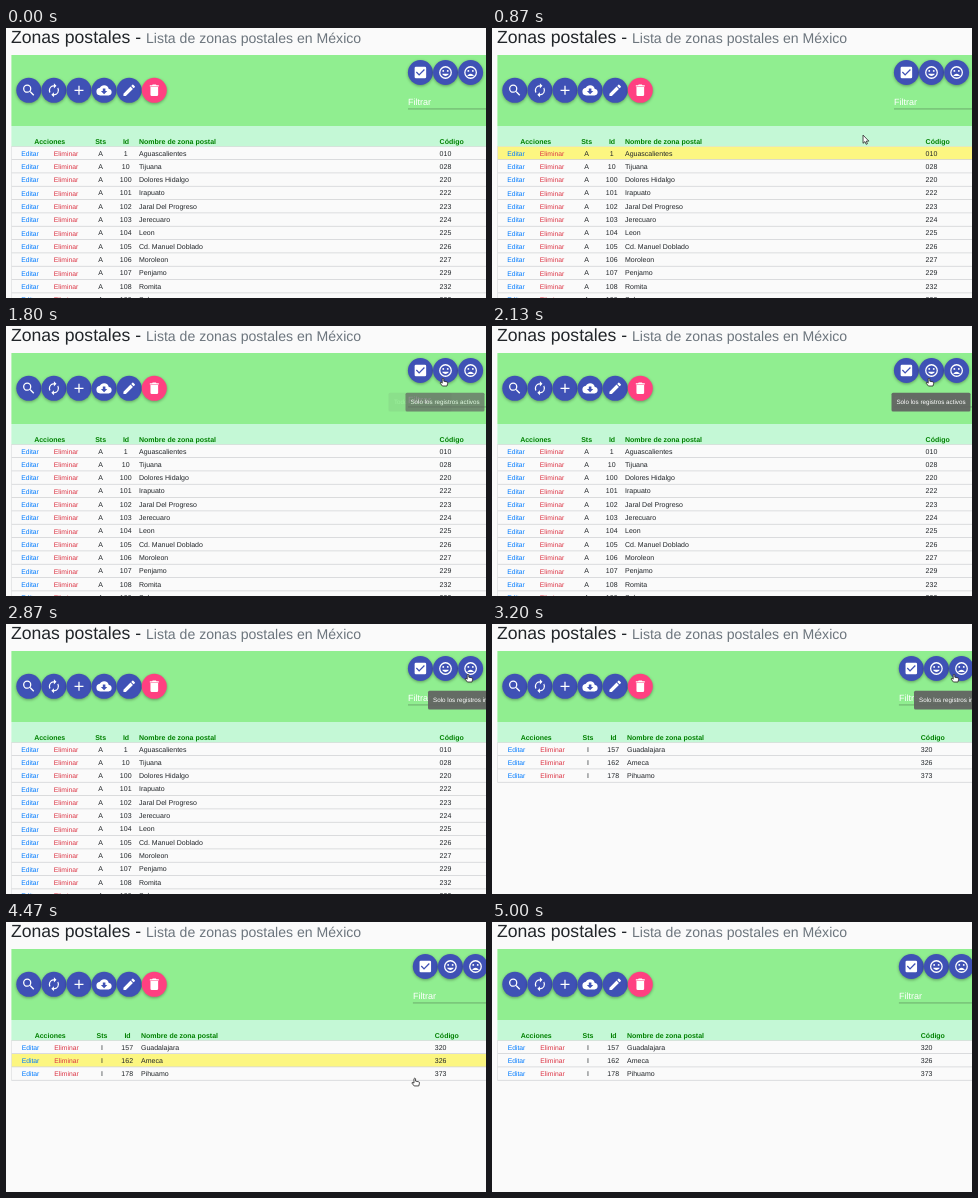
Recreate the animation shown at these times as an HTML page. Size 480x270 px, loop 5590 ms.

```html
<!DOCTYPE html>
<html lang="es">
<head>
<meta charset="utf-8">
<title>Zonas postales</title>
<style>
  html, body { margin: 0; width: 100%; height: 100%; overflow: hidden; background: #fafafa; }
  svg { display: block; width: 100vw; height: 100vh; }
  text { font: 7px "Liberation Sans", Arial, sans-serif; fill: #212529; text-rendering: geometricPrecision; white-space: pre; }
  .title { font-size: 17.6px; }
  .title tspan { font-size: 80%; fill: #6c757d; }
  .head { font-weight: bold; fill: #008000; }
  .mid { text-anchor: middle; }
  .edit { font-size: 6.75px; fill: #007bff; }
  .del { font-size: 6.75px; fill: #dc3545; }
  .filter { font-size: 9px; fill: #fff; }
  .tip { font-size: 6.25px; fill: #fff; }
  .fab { filter: drop-shadow(0 1.5px 1.5px rgba(0, 0, 0, .35)); }
  .icon { fill: #fff; fill-rule: evenodd; }
</style>
</head>
<body>
<svg id="stage" viewBox="0 0 480 270" preserveAspectRatio="none"></svg>
<script>
const LOOP = 5590, FRAME = 1000 / 15, LAG = 70;
const TOP = 118.4, PITCH = 13.33, SWITCH = 3195;

const face = 'M12 2a10 10 0 1 0 0 20 10 10 0 0 0 0-20zm0 2a8 8 0 1 1 0 16 8 8 0 0 1 0-16z' +
  'M15.5 11a1.5 1.5 0 1 0 0-3 1.5 1.5 0 0 0 0 3zM8.5 11a1.5 1.5 0 1 0 0-3 1.5 1.5 0 0 0 0 3z';
const icons = {
  search: 'M15.5 14h-.79l-.28-.27A6.47 6.47 0 0 0 16 9.5 6.5 6.5 0 1 0 9.5 16c1.61 0 3.09-.59 4.23-1.57l.27.28v.79l5 4.99L20.49 19zm-6 0a4.5 4.5 0 1 1 0-9 4.5 4.5 0 0 1 0 9z',
  renew: 'M12 6v3l4-4-4-4v3a8 8 0 0 0-8 8c0 1.57.46 3.03 1.24 4.26L6.7 14.8A5.87 5.87 0 0 1 6 12a6 6 0 0 1 6-6zm6.76 1.74L17.3 9.2c.44.84.7 1.79.7 2.8a6 6 0 0 1-6 6v-3l-4 4 4 4v-3a8 8 0 0 0 6.76-12.26z',
  add: 'M19 13h-6v6h-2v-6H5v-2h6V5h2v6h6z',
  cloud: 'M19.35 10.04A7.49 7.49 0 0 0 12 4C9.11 4 6.6 5.64 5.35 8.04A6 6 0 0 0 0 14a6 6 0 0 0 6 6h13a5 5 0 0 0 .35-9.96zM17 13l-5 5-5-5h3V9h4v4z',
  pencil: 'M3 17.25V21h3.75L17.81 9.94l-3.75-3.75zM20.71 7.04a1 1 0 0 0 0-1.41l-2.34-2.34a1 1 0 0 0-1.41 0l-1.83 1.83 3.75 3.75z',
  trash: 'M6 19a2 2 0 0 0 2 2h8a2 2 0 0 0 2-2V7H6zM19 4h-3.5l-1-1h-5l-1 1H5v2h14z',
  check: 'M19 3H5a2 2 0 0 0-2 2v14a2 2 0 0 0 2 2h14a2 2 0 0 0 2-2V5a2 2 0 0 0-2-2zm-9 14-5-5 1.41-1.41L10 14.17l7.59-7.59L19 8z',
  happy: face + 'M12 17.5c2.33 0 4.31-1.46 5.11-3.5H6.89c.8 2.04 2.78 3.5 5.11 3.5z',
  sad: face + 'M12 14c-2.33 0-4.31 1.46-5.11 3.5h10.22c-.8-2.04-2.78-3.5-5.11-3.5z'
};

const active = [
  [1, 'Aguascalientes', '010'], [10, 'Tijuana', '028'], [100, 'Dolores Hidalgo', 220],
  [101, 'Irapuato', 222], [102, 'Jaral Del Progreso', 223], [103, 'Jerecuaro', 224],
  [104, 'Leon', 225], [105, 'Cd. Manuel Doblado', 226], [106, 'Moroleon', 227],
  [107, 'Penjamo', 229], [108, 'Romita', 232], [109, 'Salamanca', 233]
];
const inactive = [[157, 'Guadalajara', 320], [162, 'Ameca', 326], [178, 'Pihuamo', 373]];

// label, centre x, show time, fade in, hide time
const tips = [
  ['Todos los registros', 414, 1270, 150, 1746, 63],
  ['Solo los registros activos', 439, 1660, 190, 2800, 79],
  ['Solo los registros inactivos', 464, 2800, 66, 3400, 84]
];

// pointer path: time, x, y
const path = [
  [440, 486, 258], [600, 440, 196], [730, 394, 142], [800, 380, 126], [867, 371, 107],
  [1070, 382, 84], [1270, 411, 51], [1600, 413, 51], [1700, 437, 52], [2800, 437, 52],
  [2866, 462, 50], [3400, 462, 50], [3600, 322, 96], [3733, 249.5, 119.2], [3930, 228, 139],
  [4200, 228, 139], [4400, 362, 144], [4467, 409, 156], [4600, 486, 146]
];

const text = (x, y, s, cls = '') => `<text x="${x}" y="${y}" class="${cls}">${s}</text>`;
const rect = (x, y, w, h, fill, more = '') =>
  `<rect x="${x}" y="${y}" width="${w}" height="${h}" fill="${fill}" ${more}/>`;
const fab = (x, y, icon, fill = '#3f51b5') =>
  `<circle class="fab" cx="${x}" cy="${y}" r="12.5" fill="${fill}"/>` +
  `<path class="icon" d="${icons[icon]}" transform="translate(${x} ${y}) scale(.64) translate(-12 -12)"/>`;

function view(id, rows, shift, col) {
  let s = ['check', 'happy', 'sad'].map((n, i) => fab(414.4 + shift + i * 25.1, 44.5, n)).join('');
  s += text(402 + shift, 76.5, 'Filtrar', 'filter') + rect(402 + shift, 80.6, 80, .7, '#5b8f5b');
  s += text(col.link + 19.7, 115.5, 'Acciones', 'head mid') + text(col.sts, 115.5, 'Sts', 'head mid') +
    text(col.id + .3, 115.5, 'Id', 'head mid') + text(col.name, 115.5, 'Nombre de zona postal', 'head') +
    text(col.code, 115.5, 'Código', 'head');
  rows.forEach(([num, name, code], i) => {
    const y = TOP + i * PITCH, base = y + 9.1;
    s += rect(5.5, y + PITCH - .5, 475, .7, '#cdcfd1') + rect(5.3, y, .6, PITCH, '#d8dadc') +
      text(col.link, base + .2, 'Editar', 'edit mid') + text(col.link + 36, base + .2, 'Eliminar', 'del mid') +
      text(col.sts, base, id === 'on' ? 'A' : 'I', 'mid') + text(col.id, base, num, 'mid') +
      text(col.name, base, name) + text(col.code, base, code);
  });
  return `<g id="${id}">${s}</g>`;
}

const tools = ['search', 'renew', 'add', 'cloud', 'pencil', 'trash'];
const stage = document.getElementById('stage');
stage.innerHTML =
  rect(0, 0, 480, 270, '#fafafa') +
  text(5, 15, 'Zonas postales - <tspan>Lista de zonas postales en México</tspan>', 'title') +
  rect(5.4, 27, 475, 71, '#90ee90') + rect(5.4, 98, 475, 20.4, '#c4f8d6') +
  rect(5.4, 118, 475, .6, '#cdd5d0') +
  tools.map((n, i) => fab(22.8 + i * 25.1, 62.3, n, n === 'trash' ? '#ff4081' : undefined)).join('') +
  rect(5.5, 0, 475, PITCH - .5, '#fcf681', 'id="hover"') +
  view('on', active, 0, { link: 24, sts: 94.6, id: 119.7, name: 133, code: 433.6 }) +
  view('off', inactive, 4.9, { link: 24.5, sts: 96, id: 121.2, name: 135, code: 428.8 }) +
  tips.map(([label, x, , , , w], i) => `<g id="tip${i}">` +
    rect(x - w / 2, 66.8, w, 18.6, '#616161', 'rx="1.5" fill-opacity=".93"') +
    text(x, 78.3, label, 'tip mid') + '</g>').join('') +
  '<g id="pointer" stroke-linejoin="round">' +
  '<path id="arrow" d="M0 0V8.2L1.9 6.5 3.1 9.2 4.4 8.6 3.2 6H5.8z" fill="#fff" stroke="#222" stroke-width=".8"/>' +
  '<path id="hand" d="M-.8.8Q0-.4.8.8V3.2L4 3.9Q4.9 4.2 4.7 5.2L4 8H-.6L-2.8 5.2Q-2.9 4.2-1.8 4.5L-.8 5.2z" fill="#fff" stroke="#222" stroke-width=".8"/>' +
  '</g>';

const el = id => document.getElementById(id);
const show = (id, on) => { el(id).style.display = on ? '' : 'none'; };
const clamp = v => Math.max(0, Math.min(1, v));

function pointerAt(t) {
  const i = path.findIndex(k => k[0] > t);
  if (i < 1) return null;
  const [t0, x0, y0] = path[i - 1], [t1, x1, y1] = path[i];
  const p = (t - t0) / (t1 - t0);
  return [x0 + (x1 - x0) * p, y0 + (y1 - y0) * p];
}

function rowAt(pos, count) {
  if (!pos || pos[0] > 480) return -1;
  const row = Math.floor((pos[1] - TOP - 1) / PITCH);
  return row < count ? row : -1;
}

function draw(time) {
  const t = Math.floor((time + 4) / FRAME) * FRAME;
  const first = t < SWITCH, count = first ? active.length : inactive.length;
  show('on', first);
  show('off', !first);

  const lit = rowAt(pointerAt(t - LAG), count);
  show('hover', lit >= 0);
  el('hover').setAttribute('y', TOP + Math.max(lit, 0) * PITCH + .3);

  tips.forEach(([, , start, fade, end], i) => {
    el('tip' + i).setAttribute('opacity', clamp((t - start) / fade) * clamp(1 - (t - end) / 60));
  });

  const pos = pointerAt(t);
  show('pointer', pos);
  if (pos) {
    const [x, y] = pos;
    const link = rowAt(pos, count) >= 0 || (x > 402 && y > 32 && y < 57);
    el('pointer').setAttribute('transform', `translate(${x} ${y})`);
    show('hand', link);
    show('arrow', !link);
  }
}

const begin = performance.now();
function tick() {
  draw((performance.now() - begin) % LOOP);
  requestAnimationFrame(tick);
}
tick();
</script>
</body>
</html>
```
